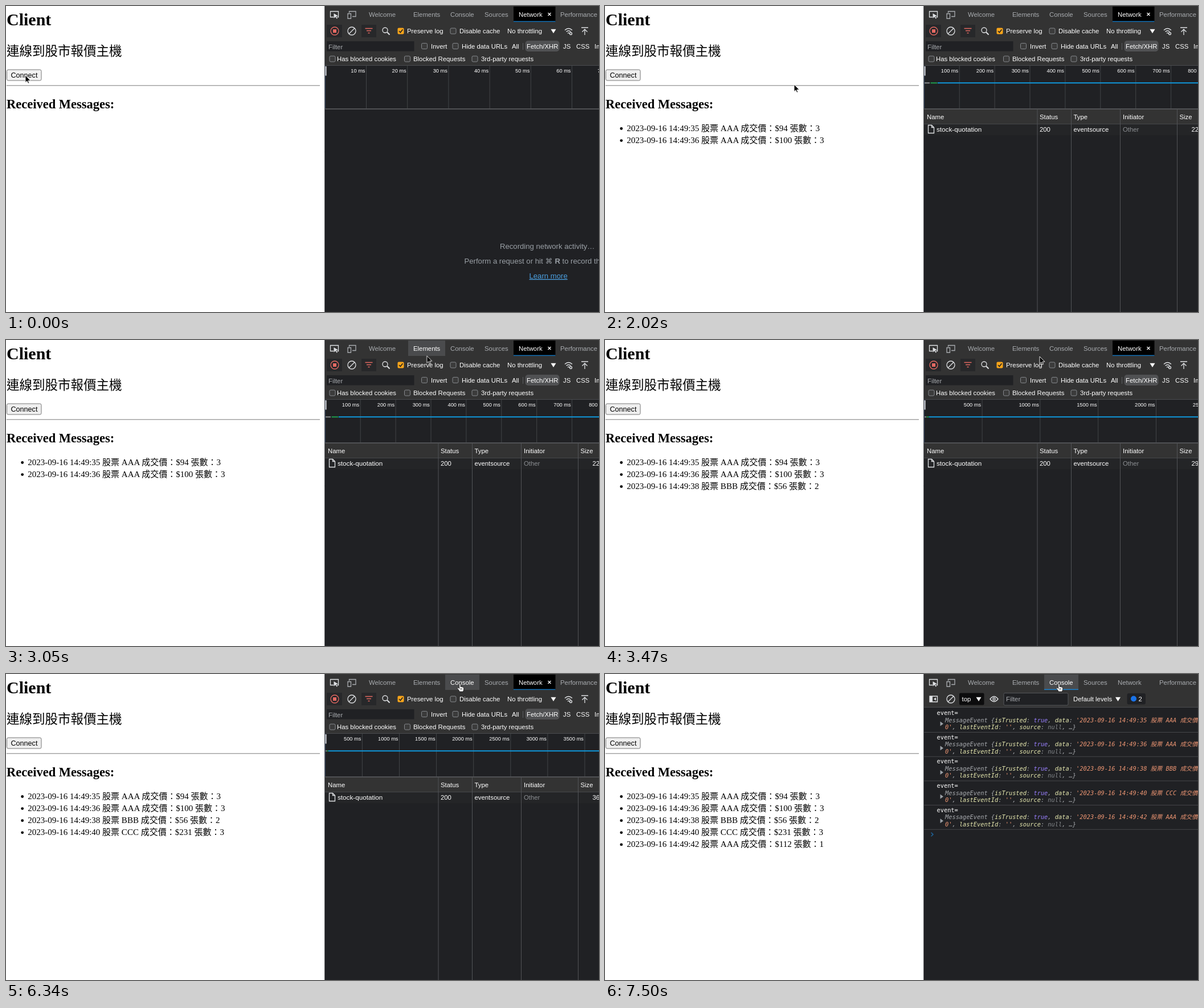
Animation, 1041 px wide and 538 px high, one loop 8 s. Source, as an HTML page:

```html
<!DOCTYPE html>
<html lang="zh-Hant">
<head>
<meta charset="utf-8">
<title>Server-sent events demo</title>
<style>
html, body { margin: 0; width: 100%; height: 100%; overflow: hidden; background: #fff; }
svg { display: block; width: 100vw; height: 100vh; }
text { white-space: pre; }
.page { font-family: "Liberation Serif", "Noto Sans CJK TC", serif; }
.h { font-size: 22.5px; font-weight: bold; }
.tools { font: 11.35px "Liberation Sans", Arial, sans-serif; fill: #fff; }
.dim { fill: #a9acb0; }
.hint { font-size: 13.15px; fill: #9aa0a6; }
.ruler { font-size: 9.25px; text-anchor: end; }
.log { font: 10.33px "DejaVu Sans Mono", "Noto Sans CJK TC", monospace; }
.obj { font-style: italic; fill: #a8abaf; }
.key { fill: #e8eab0; }
.bool { fill: #9980ff; }
.str { fill: #ee9673; }
.null { fill: #85888c; }
.icon { fill: none; stroke: #dfe1e4; stroke-width: 1.3; }
.red { stroke: #e46962; }
.box { fill: #3b3b3b; stroke: #85888c; }

/* Hard cuts */
.cut { animation: 8s step-end infinite; }
@keyframes idle { 0% { opacity: 1 } 6.25%, 100% { opacity: 0 } }
@keyframes opened { 0% { opacity: 0 } 6.25%, 100% { opacity: 1 } }
@keyframes network { 0% { opacity: 1 } 86%, 100% { opacity: 0 } }
@keyframes console { 0% { opacity: 0 } 86%, 100% { opacity: 1 } }
@keyframes logged { 0% { opacity: 0 } 86.875%, 100% { opacity: 1 } }
@keyframes lastLog { 0% { opacity: 0 } 93.75%, 100% { opacity: 1 } }
@keyframes prompt { 0% { transform: none } 93.75%, 100% { transform: translateY(42.7px) } }
@keyframes msg2 { 0% { opacity: 0 } 19%, 100% { opacity: 1 } }
@keyframes msg3 { 0% { opacity: 0 } 43.375%, 100% { opacity: 1 } }
@keyframes msg4 { 0% { opacity: 0 } 68%, 100% { opacity: 1 } }
@keyframes msg5 { 0% { opacity: 0 } 93%, 100% { opacity: 1 } }
@keyframes scale1 { 0% { opacity: 1 } 19%, 100% { opacity: 0 } }
@keyframes scale2 { 0% { opacity: 0 } 19% { opacity: 1 } 43.375%, 100% { opacity: 0 } }
@keyframes scale3 { 0% { opacity: 0 } 43.375% { opacity: 1 } 69.125%, 100% { opacity: 0 } }
@keyframes scale4 { 0% { opacity: 0 } 69.125%, 100% { opacity: 1 } }
@keyframes button { 0% { fill: #f2f2f2 } 6.25% { fill: #e5e5e5 } 20.875%, 100% { fill: #efefef } }
@keyframes hoverElements { 0% { opacity: 0 } 37.25% { opacity: 1 } 38.875%, 100% { opacity: 0 } }
@keyframes hoverConsole { 0% { opacity: 0 } 78.5%, 100% { opacity: 1 } }
@keyframes hand { 0% { opacity: 0 } 34.125% { opacity: 1 } 38.075% { opacity: 0 } 77.75%, 100% { opacity: 1 } }
@keyframes arrow { 0% { opacity: 1 } 34.125% { opacity: 0 } 38.075% { opacity: 1 } 77.75%, 100% { opacity: 0 } }

#cursor { animation: travel 8s step-end infinite; }
@keyframes travel {
  0% { transform: translate(34px, 122px) }
  20.875% { transform: translate(50px, 123px); animation-timing-function: steps(6) }
  25.25% { transform: translate(332px, 138px); animation-timing-function: steps(3) }
  27.5% { transform: translate(425px, 139px); animation-timing-function: steps(4) }
  30.5% { transform: translate(473px, 122px) }
  31.125% { transform: translate(500px, 108px); animation-timing-function: steps(5) }
  34.875% { transform: translate(642px, 23px); animation-timing-function: steps(5) }
  38.875% { transform: translate(763px, 29px) }
  76.25% { transform: translate(768px, 28px); animation-timing-function: steps(4) }
  79.25%, 100% { transform: translate(797px, 17px) }
}
</style>
</head>
<body>
<svg viewBox="0 0 1041 538" preserveAspectRatio="none">
  <defs>
    <rect id="check" class="box" x="-5" y="-5" width="10" height="10" rx="2"/>
    <path id="down" d="M-4.5-3.2h9L0 4z" fill="#fff"/>
    <g id="clear" class="icon"><circle r="7"/><path d="M5-5-5 5"/></g>
  </defs>

  <g class="page">
    <text x="1" y="33.5" font-size="30" font-weight="bold">Client</text>
    <text x="1" y="87" font-size="22.5" font-weight="500">連線到股市報價主機</text>
    <rect class="cut" style="animation-name:button" x="1.5" y="112" width="60.5" height="19" rx="2.5" stroke="#767676"/>
    <text x="8.5" y="126" font-size="12.6" font-family="Liberation Sans, Arial, sans-serif">Connect</text>
    <path d="M1 139.5h550" stroke="#a6a6a6"/>
    <path d="M1 140.5h550" stroke="#cfcfcf"/>
    <text class="h" x="1" y="180">Received Messages:</text>
    <g id="messages" font-size="15"></g>
  </g>

  <g class="tools">
    <rect x="559" width="482" height="538" fill="#202124"/>
    <rect x="559" width="482" height="58" fill="#333"/>

    <!-- Tab bar -->
    <g class="dim">
      <text x="637" y="18.5">Welcome</text><text x="715" y="18.5">Elements</text>
      <text x="780" y="18.5">Console</text><text x="840" y="18.5">Sources</text>
      <text x="900" y="18.5">Network</text><text x="973" y="18.5">Performance</text>
    </g>
    <g class="icon">
      <path d="M575 19.5h-5.5v-10h14v10h-2"/>
      <path d="M575.5 13 583 17.5 579.5 18.3 582 21.8 580.5 22.6 578.5 19.3 575.5 21.5z" fill="#dfe1e4" stroke="none"/>
      <path d="M602.5 12V9.500h11.500v9h-6M600 13.500h5.500v8.500H600z" stroke="#a9acb0"/>
    </g>
    <g class="cut" style="animation-name:hoverElements">
      <rect x="706" y="1" width="65" height="27" fill="#4a4b4d"/><text x="715" y="18.5">Elements</text>
    </g>
    <g class="cut" style="animation-name:hoverConsole">
      <rect x="771" y="1" width="60" height="27" fill="#4a4b4d"/><text x="780" y="18.5">Console</text>
    </g>

    <!-- Network panel -->
    <g class="cut" style="animation-name:network">
      <rect x="891" y="1" width="73.5" height="27" fill="#000"/>
      <rect x="891" y="26.5" width="73.5" height="1.5" fill="#1470b5"/>
      <text x="900" y="18.5">Network</text>
      <path d="M951.5 12l5 5m0-5-5 5" stroke="#fff" stroke-width="1.3"/>

      <rect x="560" y="28" width="481" height="77" fill="#333"/>
      <path d="M563 33h27v22h-27zM624 33h26v22h-26z" fill="#27282a"/>
      <circle class="icon red" cx="577" cy="44" r="7"/><rect x="574" y="41" width="6" height="6" fill="#e46962"/>
      <use href="#clear" x="607" y="44"/>
      <path class="icon red" d="M630.5 39.5h13M633 43.5h8M635.5 47.5h3"/>
      <g class="icon"><circle cx="665.5" cy="42.5" r="4.5"/><path d="M669 46l4.5 4.5" stroke-width="2"/></g>
      <rect x="687.5" y="38.5" width="11" height="11" rx="2" fill="#f9a51a"/>
      <path d="M690 44l2.4 2.6 4-5.4" fill="none" stroke="#222" stroke-width="1.6"/>
      <text x="704" y="48">Preserve log</text>
      <use href="#check" x="785" y="44"/><text x="796" y="48">Disable cache</text>
      <text x="880" y="48">No throttling</text><use href="#down" x="961" y="44"/>
      <g class="icon">
        <path d="M981 42.5q6.5-6 13 0M983.5 45.3q4-3.5 8 0M986 48q1.5-1.5 3 0"/>
        <circle cx="991.5" cy="48.5" r="2"/>
        <path d="M1010 38h12M1016 51v-9.5M1011.5 45.5 1016 41l4.5 4.5"/>
      </g>

      <rect x="563" y="62" width="153.5" height="17.5" fill="#202124"/>
      <text class="dim" x="566" y="75.5">Filter</text>
      <use href="#check" x="734.5" y="70.5"/><text x="746" y="74.5">Invert</text>
      <use href="#check" x="789" y="70.5"/><text x="800" y="74.5">Hide data URLs</text>
      <text x="888" y="74.5">All</text><path d="M907.5 65v12" stroke="#5c5e61"/>
      <rect x="911.5" y="61" width="60" height="19" rx="5" fill="#505153"/>
      <text x="914" y="74.5">Fetch/XHR</text><text x="978" y="74.5">JS</text>
      <text x="1001" y="74.5">CSS</text><text x="1033" y="74.5">Img</text>
      <use href="#check" x="573" y="93"/><text x="581" y="97">Has blocked cookies</text>
      <use href="#check" x="704.5" y="93"/><text x="715" y="97">Blocked Requests</text>
      <use href="#check" x="823" y="93"/><text x="834" y="97">3rd-party requests</text>
      <path d="M560 104.5h481" stroke="#4a4c4f"/>

      <g class="cut hint" style="animation-name:idle">
        <text x="867" y="426.5">Recording network activity…</text>
        <text x="804.5" y="452.5">Perform a request or hit</text>
        <text x="947" y="452.5" font-size="12.5" font-family="DejaVu Sans, sans-serif">⌘</text>
        <text x="963.5" y="452.5" font-weight="bold">R</text>
        <text x="976.5" y="452.5">to record the reload.</text>
        <text x="918.5" y="479" fill="#4ba0e1" text-decoration="underline">Learn more</text>
      </g>
      <g class="cut" style="animation-name:opened">
        <rect x="560" y="182" width="481" height="25" fill="#333"/>
        <path d="M560 207.5h481" stroke="#45474a"/>
        <rect x="560" y="208" width="481" height="19" fill="#242527"/>
        <path d="M759 182v356M818.5 182v356M904.5 182v356M1004.5 182v356" stroke="#515356"/>
        <text x="565" y="198.5">Name</text><text x="763" y="198.5">Status</text><text x="822.5" y="198.5">Type</text>
        <text x="909" y="198.5">Initiator</text><text x="1008.5" y="198.5">Size</text>
        <path class="icon" stroke-width="1" d="M567.5 209.5h6l4 4v10h-10zM573.5 209.5v4h4"/>
        <text x="582" y="221" font-size="11.7">stock-quotation</text><text x="763" y="221">200</text>
        <text x="822.5" y="221">eventsource</text><text x="909" y="221" fill="#8b8e92">Other</text>
      </g>
      <g id="scales"></g>
      <path d="M560.5 105v75" stroke="#34455f"/>
      <rect x="560.5" y="106" width="2" height="16.5" fill="#e0e2e5"/>
      <path d="M560 181h481" stroke="#606265" stroke-width="1.5"/>
    </g>

    <!-- Console panel -->
    <g class="cut" style="animation-name:console">
      <rect x="771" y="26.5" width="60" height="1.5" fill="#1a80cc"/>
      <path d="M560 58.5h481" stroke="#4a4c4f"/>
      <path class="icon" d="M570 39h13.5v10H570z"/><path d="M570 39h5v10h-5zM577 44l4-2.7v5.4z" fill="#dfe1e4"/>
      <use href="#clear" x="607" y="44"/>
      <rect x="622" y="33.5" width="43.5" height="21" rx="2" fill="#0c0c0d"/>
      <text x="626.5" y="48">top</text><use href="#down" x="656" y="44"/>
      <g class="icon"><path d="M676 44q7-9 14 0-7 9-14 0z"/><circle cx="683" cy="44" r="2"/></g>
      <rect x="700" y="33.5" width="113" height="21.5" rx="2" fill="#202124" stroke="#55575a"/>
      <text class="dim" x="704" y="48">Filter</text>
      <text x="822" y="48">Default levels</text><use href="#down" x="900.5" y="44"/>
      <rect x="916.5" y="34" width="32.5" height="19.5" rx="3" fill="#202124"/>
      <circle cx="928" cy="43.5" r="5" fill="#1a73e8"/><text x="936.5" y="47.5">2</text>
      <g id="logs" class="log"></g>
      <g class="cut" style="animation-name:logged">
        <path class="cut" style="animation-name:prompt" d="M572.5 236l3.5 3.2-3.5 3.2" fill="none" stroke="#1f6fae" stroke-width="1.3"/>
      </g>
    </g>
    <path d="M559.5 0v538" stroke="#55575a"/>
  </g>

  <g id="cursor">
    <path class="cut" style="animation-name:arrow" d="M0 0V12.5L2.9 9.9 4.8 14.2 6.7 13.4 4.9 9.2H9z" stroke="#fff" stroke-width=".9"/>
    <path class="cut" style="animation-name:hand" d="M-1.3 8V1.3a1.2 1.2 0 0 1 2.4 0V5.5q1.2-.8 2 .3 1.3-.6 1.9.5 1.6-.2 1.6 1.4V10q0 2-1.4 4H-.8Q-1.8 11.5-4 9.2q-1.6-1.6-.3-2.3 1.2-.4 3 1.6zM1.1 8V10.5M3.1 8V10.5" fill="#fff" stroke="#111" stroke-width=".8"/>
  </g>
</svg>
<script>
const fill = (id, parts) => { document.getElementById(id).innerHTML = parts.join(""); };
const cut = (name, body) => `<g class="cut" style="animation-name:${name}">${body}</g>`;

// seconds, stock, price, lots
const trades = [[35, "AAA", 94, 3], [36, "AAA", 100, 3], [38, "BBB", 56, 2], [40, "CCC", 231, 3], [42, "AAA", 112, 1]];
const stamp = (sec, stock) => `2023-09-16 14:49:${sec} 股票 ${stock} 成交價：`;

fill("messages", trades.map(([sec, stock, price, lots], i) => {
  const y = 220 + 21.1 * i;
  return cut(i ? `msg${i + 1}` : "opened",
    `<circle cx="28.7" cy="${y - 4.5}" r="2.4"/>
     <text x="38.3" y="${y}">${stamp(sec, stock)}$${price} 張數：${lots}</text>`);
}));

const span = (cls, s) => `<tspan class="${cls}">${s}</tspan>`;
fill("logs", trades.map(([sec, stock], i) =>
  cut(i < 4 ? "logged" : "lastLog",
    `<g transform="translate(0 ${42.7 * i})">
      <text x="582.5" y="72">event=</text>
      <text class="obj" x="597" y="84.5">MessageEvent {${span("key", "isTrusted")}: ${span("bool", "true")}, ${span("key", "data")}: ${span("str", "'" + stamp(sec, stock))}</text>
      <text class="obj" x="597" y="97">${span("str", "0'")}, ${span("key", "lastEventId")}: ${span("str", "''")}, ${span("key", "source")}: ${span("null", "null")}, …}</text>
      <path d="M588.5 83.5v8l5.5-4z" fill="#9aa0a6"/>
      <path d="M560 102.5h481" stroke="#45474a"/>
    </g>`)));

// ms per division, pixels per division, bytes received, end of the request in ms
const scales = [[10, 72.2, 151, 37], [100, 61.9, 221, 2e3], [500, 101.8, 291, 5e3], [500, 65.1, 361, 5e3]];
const phases = [[0, 14.5, "#8a8d91"], [17, 36, "#1f9d4d"]];

fill("scales", scales.map(([ms, step, bytes, end], i) => {
  let grid = "";
  for (let n = 1; n * step < 520; n++) {
    const x = 560.3 + n * step;
    grid += `<path d="M${x} 105v75" stroke="#414447"/><text class="ruler" x="${x - 2}" y="117">${n * ms} ms</text>`;
  }
  const at = t => 561 + t * step / ms;
  const bars = [...phases, [37, end, "#0f98dc"]].map(([a, b, color]) =>
    `<path d="M${at(a)} 135.3H${Math.min(at(b), 1041)}" stroke="${color}" stroke-width="2"/>`).join("");
  return cut(`scale${i + 1}`,
    grid + cut("opened", `${bars}<text x="1029.5" y="221">${bytes} B</text>`));
}));
</script>
</body>
</html>
```
